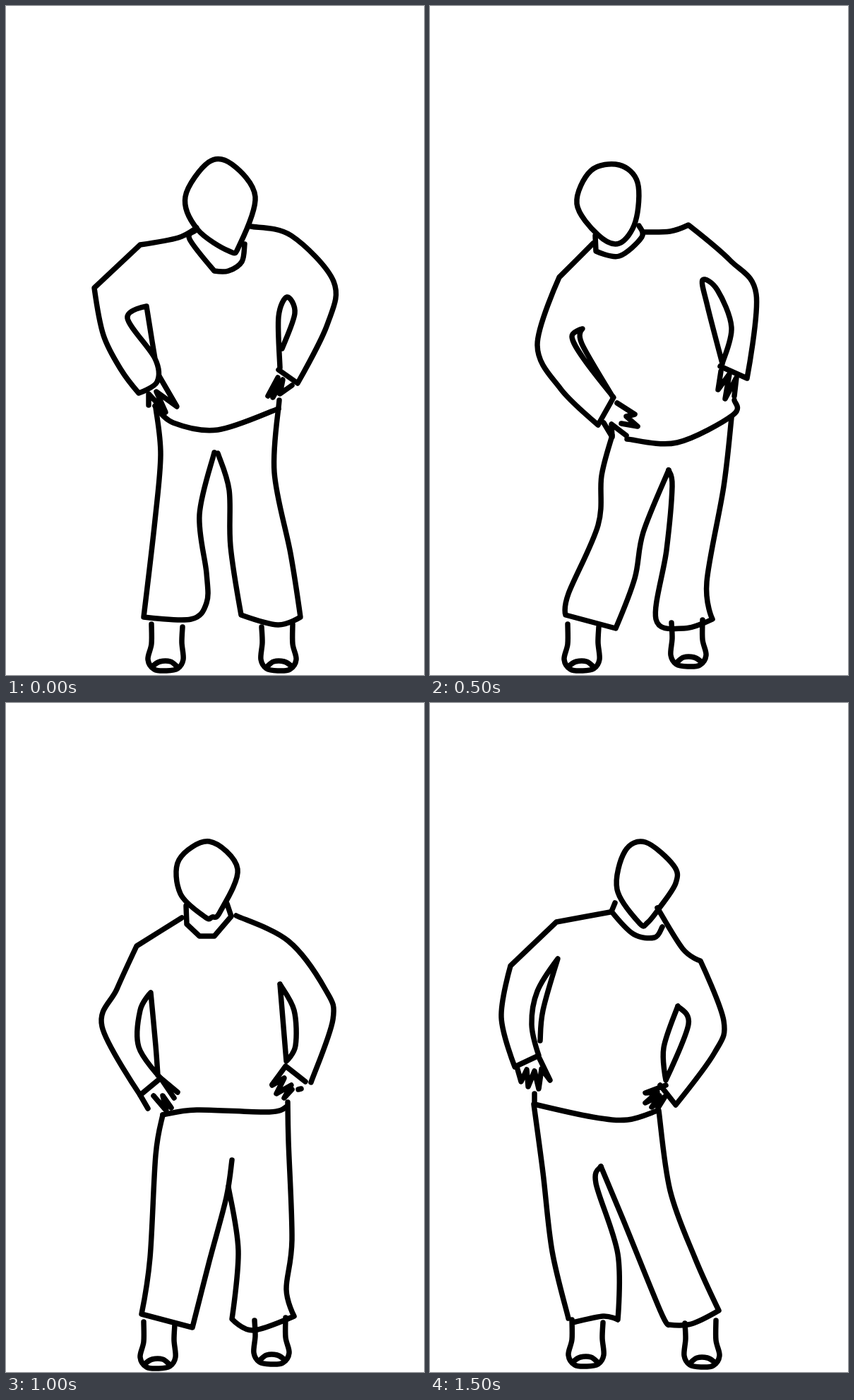
Recreate the animation shown at these times as an HTML page with a canvas. Size 592x947 px, loop 2 s.

```html
<!DOCTYPE html>
<html lang="en">
<head>
<meta charset="utf-8">
<title>Swaying figure</title>
<style>
  html, body { margin: 0; width: 100%; height: 100%; overflow: hidden; background: #fff; }
  canvas { display: block; }
</style>
</head>
<body>
<canvas width="592" height="947"></canvas>
<script>
const HOLD = 500;
const ctx = document.querySelector('canvas').getContext('2d');

// Points are "x,y"; a trailing "!" makes a corner, "/" lifts the pen.
const parse = part => part.trim().split(/\s+/).map(word => {
  const [x, y] = word.replace('!', '').split(',').map(Number);
  return { x, y, corner: word.endsWith('!') };
});

function trace(points, smooth, closed) {
  const n = points.length;
  const at = i => closed ? points[(i + n) % n] : points[Math.max(0, Math.min(n - 1, i))];
  const pull = (i, axis) =>
    smooth && !at(i).corner ? (at(i + 1)[axis] - at(i - 1)[axis]) / 6 : 0;
  ctx.beginPath();
  ctx.moveTo(points[0].x, points[0].y);
  for (let i = 0; i < (closed ? n : n - 1); i++) {
    const a = at(i), b = at(i + 1);
    ctx.bezierCurveTo(a.x + pull(i, 'x'), a.y + pull(i, 'y'),
      b.x - pull(i + 1, 'x'), b.y - pull(i + 1, 'y'), b.x, b.y);
  }
  ctx.stroke();
}

const curve = text => text.split('/').forEach(part => trace(parse(part), true, false));
const scribble = text => text.split('/').forEach(part => trace(parse(part), false, false));
const head = text => trace(parse(text), true, true);

function shoe(x, y, side) {
  ctx.save();
  ctx.translate(x, y);
  ctx.scale(side, 1);
  curve('5,0 5,28 0,50 9,64 26,66 42,63 50,50 48,26 49,4 / 7,59 17,53 32,53 41,60');
  ctx.restore();
}

function leanForward() {
  head('271,316 254,270 287,221 320,224 353,270 330,340 316,347');
  curve('268,318 260,330 295,375! 315,375 334,362 338,337');
  curve('270,314 244,328 190,338! 125,399! 138,466 163,515 188,548! 214,532 211,499 172,442 199,425! 207,475 211,499');
  curve('347,312 404,325 464,390 455,451 413,534! 386,515');
  curve('388,512 386,440 398,412 409,435 391,485');
  scribble('202,565 202,549 226,575 213,546 242,567 217,524');
  scribble('371,552 385,526 378,554 392,529 388,549 405,537');
  curve('211,566 237,590 300,600 386,570');
  curve('212,568 219,635 211,728 195,865! 262,868 284,845 284,803 274,720 295,632');
  curve('300,633 316,685 318,765 333,862! 385,876 417,865! 403,775 380,660 387,558');
  shoe(201, 875, 1);
  shoe(411, 875, -1);
}

function swayRight() {
  head('238,324 208,280 228,233 268,225 294,250 291,305 268,336');
  curve('234,325 235,347! 268,354 300,327 296,311');
  curve('231,336 183,384! 152,480 185,542 238,593! 260,554! 218,500 201,468 216,457! 215,478 258,552');
  curve('303,320 340,319 366,310! 425,360 462,408 449,527! 411,510');
  curve('414,506 427,455 407,402 386,388 393,425 414,506');
  scribble('265,562 290,578 278,581 294,595 271,591 / 278,608 257,592 258,610 246,590');
  scribble('412,517 408,543 424,521 418,556 434,526 431,552');
  curve('279,613 350,618 429,579 431,558');
  curve('258,608 243,665 238,735 196,832 192,862! 263,881! 290,810 302,745 338,657');
  curve('338,657 343,680 335,770 320,868 360,881 400,868! 392,815 416,680 427,583');
  shoe(190, 875, 1);
  shoe(391, 869, -1);
}

function standUpright() {
  head('282,303 247,270 245,222 288,196 328,235 303,296 292,303');
  curve('255,287 256,313! 274,330! 295,330! 319,302! 313,284');
  curve('249,304 185,344! 157,405 136,458 190,555! 219,531! 188,487 190,435 205,410! 212,485 215,527');
  curve('326,301 400,337 452,405 463,448 432,537');
  curve('424,536 396,514! 377,540 / 388,398 408,435 410,485 397,507! 388,398');
  scribble('190,555 201,574 / 209,556 227,577 222,556 234,573 / 238,559 219,531 243,551');
  scribble('377,541 394,531 383,553 404,541 394,559 405,547 / 414,547 418,546');
  curve('222,583 270,576 373,579 398,571');
  curve('222,583 212,640 204,785 192,865! 264,884! 288,790 312,700 320,647');
  curve('315,685 329,775 320,872! 350,888 408,868! 397,830 405,760 400,620 399,565');
  shoe(190, 876, 1);
  shoe(401, 870, -1);
}

function swayLeft() {
  head('297,312 265,264 276,210 305,197 345,230 348,255 325,290 308,311');
  curve('262,283 257,295! 288,327 318,332 329,317');
  curve('255,296 179,310! 114,372! 101,445 120,515! 154,499! 144,455 152,408 181,362! 160,435 156,478');
  curve('322,290 358,348 383,365! 416,450 403,495 348,569! 326,541');
  curve('351,429 366,455 334,534! 331,488 351,429');
  scribble('123,515 129,536 137,519 139,543 148,521 154,546 158,518 170,534 155,503');
  scribble('334,541 305,552 322,551 305,566 325,556 314,572 333,557 323,573');
  curve('148,553 148,568! 230,586 280,590 322,577');
  curve('147,568 160,665 173,776 196,871 / 202,877 245,868 266,873! 266,780 235,680 242,656');
  curve('242,656 273,730 326,860 338,880! 370,879 409,860! 375,785 340,690 324,577');
  shoe(196, 873, 1);
  shoe(410, 874, -1);
}

const poses = [leanForward, swayRight, standUpright, swayLeft];
const start = performance.now();
ctx.lineWidth = 7.5;
ctx.lineCap = ctx.lineJoin = 'round';

function draw() {
  const step = Math.floor((performance.now() - start) / HOLD) % poses.length;
  ctx.clearRect(0, 0, 592, 947);
  poses[step]();
  requestAnimationFrame(draw);
}
draw();
</script>
</body>
</html>
```
